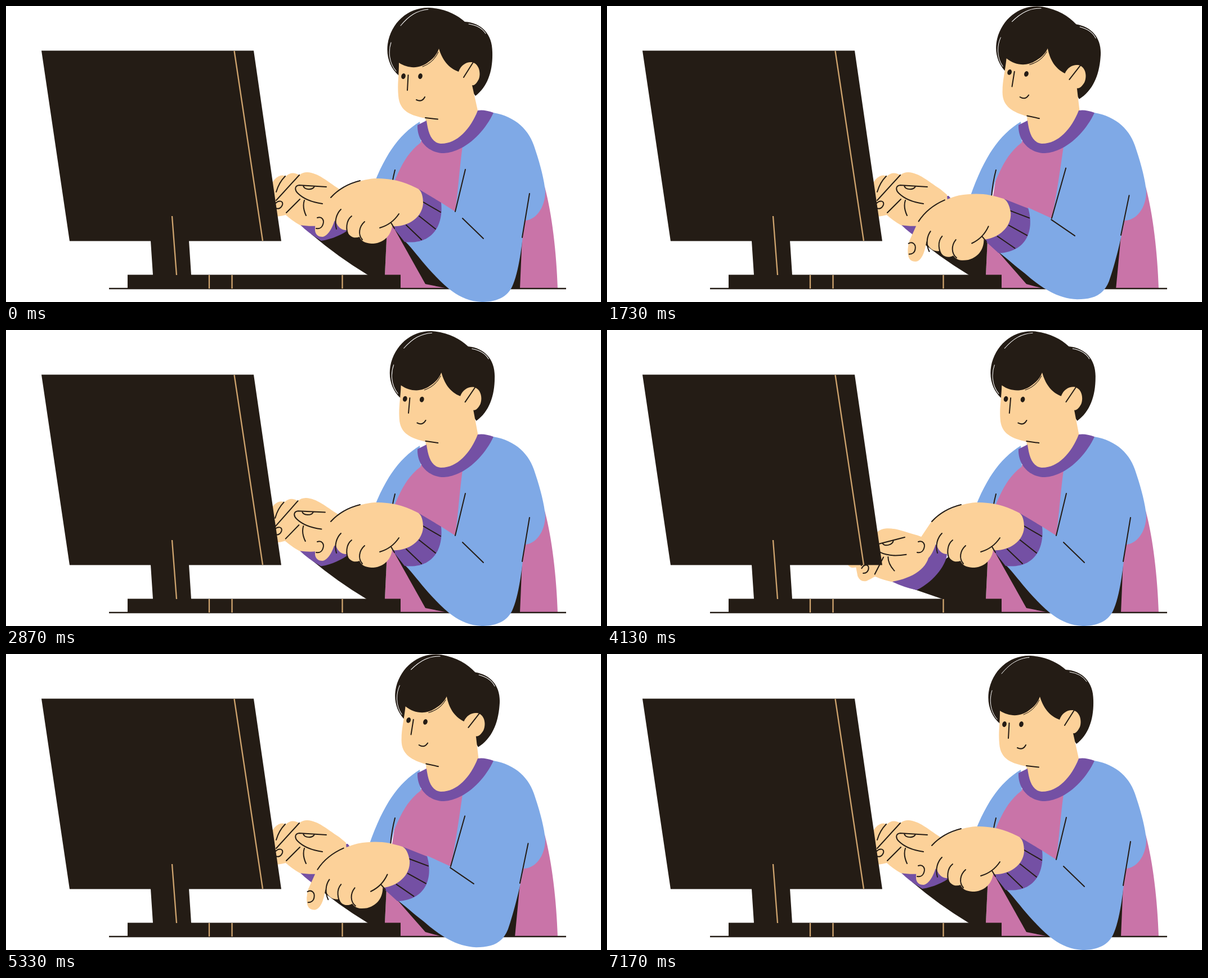
An HTML page for the animation above (7.21 s loop, 1057 px wide and 527 px high).

```html
<!DOCTYPE html>
<html lang="en">
<head>
<meta charset="utf-8">
<title>Typing at the desk</title>
<style>
  html, body { margin: 0; width: 100%; height: 100%; overflow: hidden; background: #fff; }
  svg { display: block; width: 100%; height: 100%; }
  .ink { fill: #241c15; }
  .skin { fill: #fcd199; }
  .blue { fill: #7fa9e6; }
  .pink { fill: #c974a8; }
  .purple { fill: #7450a4; }
  .line, .trim, .shine { fill: none; stroke: #241c15; stroke-width: 2; stroke-linecap: round; stroke-linejoin: round; }
  .trim { stroke: #d0a56f; stroke-width: 2.3; stroke-linecap: butt; }
  .shine { stroke: #fff; stroke-width: 1; }
</style>
</head>
<body>
<svg viewBox="0 0 1057 527">
  <clipPath id="eyeClip"><rect id="lid" x="690" y="118" width="60" height="30"/></clipPath>

  <path class="pink" d="M738 240C712 262 702 280 690 312L677 395 673 479H701V503H980C978 440 970 370 957 322L811 250Z"/>
  <path class="ink" id="farForearm"/>
  <path class="blue" d="M735 206C700 228 672 262 645 340L683 342 690 312C702 285 712 262 737 243Z"/>
  <path class="line" d="M691 292Q685 315 683 340"/>

  <g id="farHand">
    <path class="purple" d="M522 389Q538 405 560 418C600 412 630 385 632 370L607 338 590 340Z"/>
    <path class="skin" d="M592 326C570 312 555 297 535 296Q527 296 521 301 508 293 497 303 487 298 477 309L458 335Q457 345 470 346L468 362Q469 374 480 375 490 374 497 372 508 382 522 390C560 396 600 388 605 350L604 336Z"/>
    <path class="line" d="M496 303Q485 314 480 331M521 301L480 346M522 344L498 368M569 322L521 319C512 320 513 328 518 333 527 342 540 349 562 352M528 320C530 328 545 328 548 321M530 346Q526 358 533 373M479 351C485 345 493 347 491 354 489 360 484 362 479 360"/>
  </g>

  <g id="head">
    <path class="ink" d="M698 124C683 111 675 91 678 68 684 29 715 2 752 3 780 5 800 15 815 28 845 30 864 50 864 82 865 115 856 143 834 160L815 135 760 110Z"/>
    <path class="shine" d="M693 116C680 101 679 80 684 65M701 35C716 17 730 8 750 6M822 32Q843 35 852 49"/>
    <path class="skin" d="M698 101C715 112 735 112 750 100 760 93 766 85 769 76 775 95 785 110 804 117 808 105 818 99 828 100 840 103 844 118 840 130 836 138 832 142 828 141L838 186C825 220 800 250 772 250 755 247 748 225 745 200 720 195 699 188 697 160 695 140 698 125 698 101Z"/>
    <path class="line" style="stroke-width:1" d="M740 108Q759 101 768 82"/>
    <g class="ink" clip-path="url(#eyeClip)">
      <ellipse cx="706" cy="125" rx="3.8" ry="5" transform="rotate(12 706 125)"/>
      <ellipse cx="736" cy="125" rx="3.8" ry="5" transform="rotate(12 736 125)"/>
    </g>
    <path class="line" d="M714.500 123L713 150M729 167Q739 172 744 162M745 199L767 201.500M830 100L813 127"/>
  </g>

  <g class="ink"><path id="shadeLeft"/><path id="shadeRight"/></g>
  <g class="ink">
    <path d="M63 79.500H440L489 418.500H113ZM257 418H325L329 479H261ZM216 478.500H701V503H216Z"/>
    <rect x="183" y="501.800" width="812" height="2.500"/>
  </g>
  <path class="trim" d="M405.500 80L456 418M295 374L303 479M361 479V503M401.500 479V503M597.500 479V503"/>

  <path class="blue" id="sleeve"/>
  <path class="purple" d="M731 212L747 204C750 225 755 243 772 245 800 246 825 220 838 186Q850 184 866 190C850 225 815 260 778 262 750 262 730 240 731 212Z"/>
  <path class="line" id="folds"/>
  <g id="nearHand">
    <path class="purple" d="M733 326L773 350C777 385 762 426 708 420L686 392Z"/>
    <path class="line" d="M741 349L772 367M734 374L763 397M711 390L738 416"/>
    <path class="skin" d="M577 340L555 373Q548 388 549 400C550 408 556 411 562 411 572 410 580 395 585 378 586 392 596 400 606 399 608 410 618 415 628 411 632 421 642 423 653 423 674 421 684 406 686 392 712 394 739 378 741 352 741 338 738 330 733 326 710 314 690 307 655 307 625 309 592 325 577 340Z"/>
    <path class="line" d="M577 341Q597 319 629 311M595 362C587 370 583 383 587 397M614 374C604 382 603 398 609 410M637 384C627 393 625 407 633 416M698 370C690 382 678 391 664 395M684 386L690 396M553 377C561 374 566 381 563 389 561 395 556 397 551 396"/>
  </g>
</svg>
<script>
const CYCLE = 3605;
const el = id => document.getElementById(id);

const ease = (t, from, to) => {
  const u = Math.min(1, Math.max(0, (t - from) / (to - from)));
  return (1 - Math.cos(Math.PI * u)) / 2;
};
// Rises from a to b, holds, falls back from c to d.
const pulse = (t, a, b, c, d) => ease(t, a, b) - ease(t, c, d);

// Blends two paths that share the same commands.
function blend(a, b, k) {
  const ends = b.match(/\d+/g);
  let i = 0;
  return a.replace(/\d+/g, n => (+n + (ends[i++] - n) * k).toFixed(2));
}

const nearPaths = {
  sleeve: [
    "M866 190C905 197 930 220 940 255C950 285 956 310 958 330C958 360 940 382 921 382C917 425 911 475 899 500C888 522 865 527 845 527C805 525 780 500 750 467C735 450 722 432 710 420L773 350L798 366C803 330 806 285 811 250L838 215Z",
    "M866 190C905 197 930 220 940 255C950 285 956 310 958 330C958 360 940 382 919 382C914 405 901 455 890 488C880 515 860 521 833 521C800 520 770 503 740 478C722 466 708 454 695 445L742 361L788 381C797 345 806 285 811 250L838 215Z"
  ],
  folds: [
    "M816 291L798 366M811 378L848 414M930 334Q923 375 917 412",
    "M815 288L788 381L784 381L827 408M927 338Q919 375 912 407"
  ],
  shadeLeft: [
    "M684 386L745 495L785 503L810 503L722 410Z",
    "M666 414L745 495L772 503L800 503L710 430Z"
  ],
  shadeRight: [
    "M920 382L917 410L913 503L885 503L900 430Z",
    "M917 385L912 410L902 503L870 503L890 430Z"
  ]
};
const farForearm = [
  "M542 406Q590 447 643 479L673 479L677 395L632 370Z",
  "M538 459Q570 470 596 479L673 479L677 395L605 405Z"
];

function draw(now) {
  const t = now % 7210 % CYCLE;
  const near = pulse(t, 560, 1070, 1450, 2415);
  const far = pulse(t, 0, 520, 600, 1290) + pulse(t, 1750, 2270, 2350, 2960);
  const nod = pulse(t, 0, 1450, 1800, 3530);
  const blink = pulse(t, 1000, 1120, 1140, 1260);

  for (const [id, [up, down]] of Object.entries(nearPaths))
    el(id).setAttribute("d", blend(up, down, near));
  el("farForearm").setAttribute("d", blend(...farForearm, far));
  el("nearHand").setAttribute("transform",
    `translate(${-30 * near} ${20 * near}) rotate(${-11.6 * near} 738 350)`);
  el("farHand").setAttribute("transform",
    `translate(${-40 * far} ${47 * far}) rotate(${-18 * far} 569 322)`);
  el("head").setAttribute("transform", `rotate(${5.9 * nod} 780 210)`);
  el("lid").setAttribute("y", 118 + 8 * blink);
  requestAnimationFrame(draw);
}
draw(performance.now());
</script>
</body>
</html>
```
